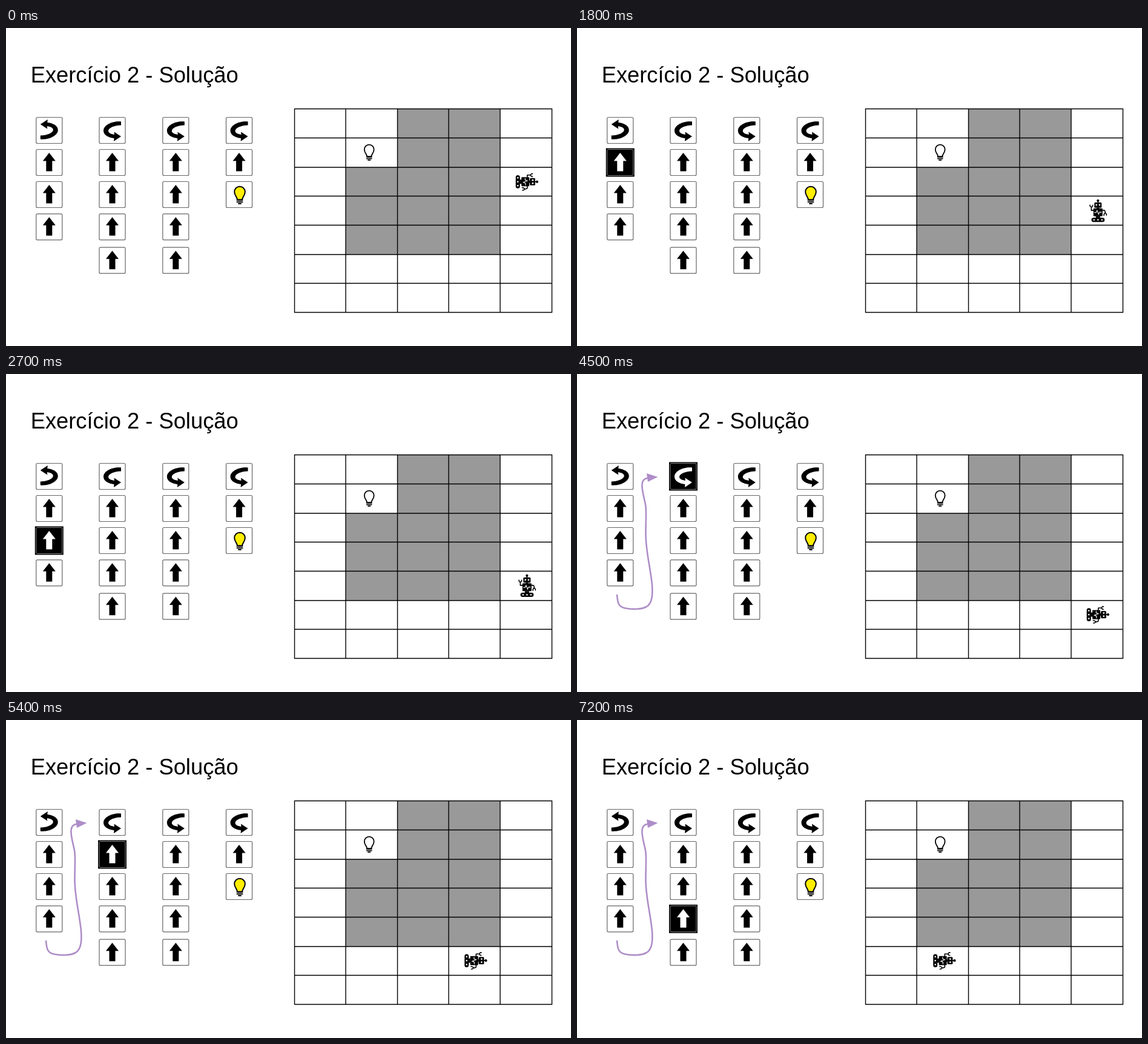
Animation, 933 px wide and 525 px high, one loop 8000 ms. Source, as an HTML page:

```html
<!DOCTYPE html>
<html lang="pt">
<head>
<meta charset="utf-8">
<title>Exercício 2 - Solução</title>
<style>
html, body { margin: 0; width: 100%; height: 100%; overflow: hidden; background: #fff; }
svg { display: block; width: 100vw; height: 100vh; }
text { font-family: "Liberation Sans", Arial, sans-serif; font-size: 36.3px; }
.btn { color: #000; }
.btn .back { fill: none; }
.btn .edge { fill: #fff; stroke: #666; stroke-width: 1.2; }
.btn.on { color: #fff; }
.btn.on .back { fill: #000; }
.btn.on .edge { fill: #000; stroke: #858585; stroke-width: 1; }
</style>
</head>
<body>
<svg viewBox="0 0 933 525">
  <defs>
    <path id="forward" fill="currentColor" d="M0-16L10.5-2.5H5V14.5H-5V-2.5H-10.5Z"/>
    <path id="right" fill="currentColor" d="M14.5-14.5C1-16-14.5-9-14.5 .5C-14.5 8 -6 12 3 13L2.5 18L14.5 10L3 2.5L3.5 7C-3 6-6.5 4-6.5 .8C-6.5-4 4-8.5 14.5-8.5Z"/>
    <use id="left" href="#right" transform="rotate(180)"/>
    <g id="bulb" stroke="#000" stroke-linecap="round">
      <path stroke-width="2" d="M-4 7.5C-4 3-8.8 1-8.8-5.5A8.8 8.8 0 0 1 8.8-5.5C8.8 1 4 3 4 7.5Z"/>
      <path fill="none" stroke-width="2" d="M-4.5 8.2H4.5M-4.5 11.2H4.5M-2 14H2"/>
    </g>
    <use id="light" href="#bulb" fill="#ffee00" x="1" y="1"/>
    <g id="bot">
      <circle cy="-16.6" r="2.1"/>
      <path d="M-.8-16H.8V-13H-.8Z"/>
      <rect x="-6" y="-13.6" width="12" height="8.8" rx="1.5"/>
      <path d="M-2-5H2V-3H-2Z"/>
      <rect x="-7.5" y="-3.8" width="15" height="13" rx="1"/>
      <path d="M-3.5 9H3.5V12H-3.5Z"/>
      <rect x="-10.8" y="11.6" width="21.8" height="7" rx="3.5"/>
      <g fill="none" stroke="#000" stroke-width="1.6" stroke-linecap="round" stroke-linejoin="round">
        <path d="M-7.5-.5H-11V-5M-13.2-9.2C-14-5.5-8.3-4.8-8.7-9"/>
        <path d="M7.5-.5H10.5Q12 0 12 4M9.8 8C9.8 3 14.2 3 14 7.5"/>
      </g>
      <g fill="#fff">
        <circle cx="-2.6" cy="-9.5" r="1.4"/><circle cx="2.6" cy="-9.5" r="1.4"/>
        <circle cx="-6.5" cy="15.1" r="1.3"/><circle cy="15.1" r="1.3"/><circle cx="6.5" cy="15.1" r="1.3"/>
      </g>
      <path fill="none" stroke="#fff" stroke-width="1.1" d="M-6 3H-3L-1.5-.5L1 6L2.5 2.5H6"/>
    </g>
  </defs>
  <rect width="933" height="525" fill="#fff"/>
  <text x="40.7" y="89.5">Exercício 2 - Solução</text>
  <g id="buttons"></g>
  <g id="link">
    <path fill="none" stroke="#ae8dc8" stroke-width="2.6" d="M66 364C67 377 68 384 79 386.5C91 389 106 389 115 384C125 378 125 362 124 348C121 318 113 290 113.5 262C113.5 245 115 225 113 215C110 201 107 192 107.5 183C108 175 111 173 117 171.5"/>
    <path fill="#ae8dc8" d="M133.5 170L115 164L117 178Z"/>
  </g>
  <path fill="#999" d="M646.5 133.5H816V374H561V230H646.5Z"/>
  <path id="grid" fill="none" stroke="#000" stroke-width="1.4" stroke-linecap="square"/>
  <use href="#bulb" fill="#fff" transform="translate(599.7 205.5) scale(.9)"/>
  <use id="robot" href="#bot"/>
</svg>
<script>
const NS = "http://www.w3.org/2000/svg";
const $ = id => document.getElementById(id);
const STEP = 900, LOOP = 8000;

function add(parent, tag, attrs) {
  const el = document.createElementNS(NS, tag);
  for (const k in attrs) el.setAttribute(k, attrs[k]);
  return parent.appendChild(el);
}

const box = (g, cls, r, rx) =>
  add(g, "rect", { class: cls, x: -r, y: -r, width: 2 * r, height: 2 * r, rx });

// The program, one list per column
const program = [
  ["left", "forward", "forward", "forward"],
  ["right", "forward", "forward", "forward", "forward"],
  ["right", "forward", "forward", "forward", "forward"],
  ["right", "forward", "light"]
];
const colX = [71.3, 175.5, 280.3, 385];
const rowY = [169, 222, 275, 328.3, 383.7];

const buttons = program.flatMap((cmds, c) => cmds.map((cmd, r) => {
  const g = add($("buttons"), "g", { transform: `translate(${colX[c]} ${rowY[r]})` });
  box(g, "back", 23.5, 0);
  box(g, "edge", 21.5, 2);
  add(g, "use", { href: "#" + cmd });
  return g;
}));

const xs = [476.5, 561, 646.5, 731, 816, 901.5];
const ys = [133.5, 181.5, 230, 277.5, 325.5, 374, 421.5, 469.5];
$("grid").setAttribute("d",
  xs.map(x => `M${x} 133.5V469.5`).join("") + ys.map(y => `M476.5 ${y}H901.5`).join(""));

function draw(time) {
  const step = Math.floor((time % LOOP) / STEP);
  const down = Math.min(Math.max(step - 1, 0), 3);
  const across = Math.max(step - 5, 0);
  const turned = step === 0 || step > 4;
  const x = 860.3 - across * 84.5, y = 253.8 + down * 47.8;
  $("robot").setAttribute("transform", `translate(${x} ${y}) rotate(${turned ? 90 : 0})`);
  $("link").setAttribute("visibility", step > 4 ? "visible" : "hidden");
  buttons.forEach((b, i) => b.setAttribute("class", i === step - 1 ? "btn on" : "btn"));
}

let start;
function tick(now) {
  start ??= now;
  draw(now - start);
  requestAnimationFrame(tick);
}
draw(0);
requestAnimationFrame(tick);
</script>
</body>
</html>
```
